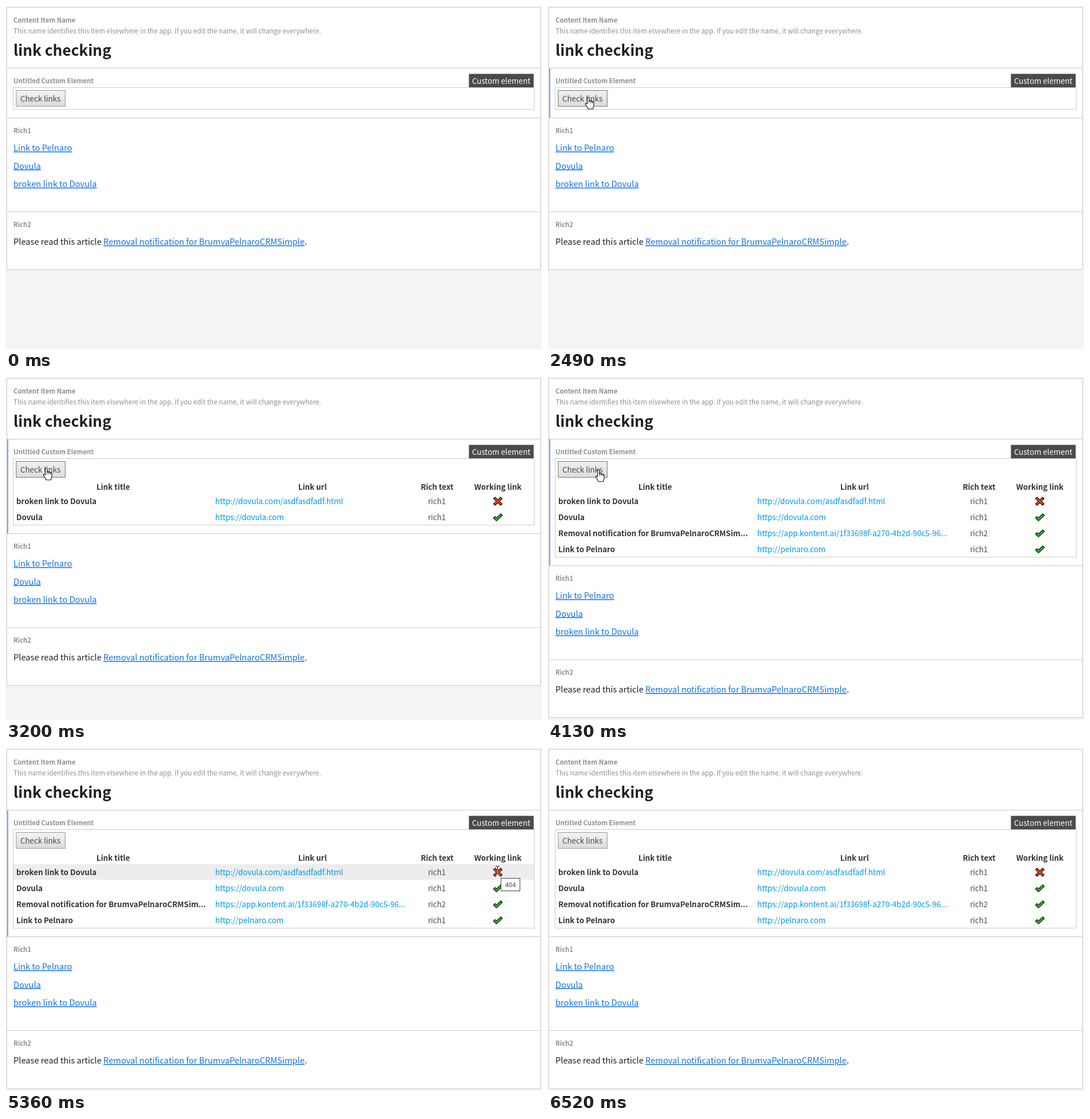
An HTML page for the animation above (7.38 s loop, 935x599 px).

```html
<!DOCTYPE html>
<html lang="en">
<head>
<meta charset="utf-8">
<title>Link checking</title>
<style>
  html, body { margin: 0; width: 100%; height: 100%; overflow: hidden; background: #f4f4f4; }
  svg { display: block; width: 100%; height: 100%; isolation: isolate; }
  text { font: 13.3px "Noto Sans CJK JP", "Noto Sans CJK SC", "Open Sans", sans-serif; fill: #4a4a4a; }
  .label { font-size: 11.3px; font-weight: 700; fill: #8f8f8f; }
  .hint { font-size: 11.7px; fill: #8f8f8f; }
  .title { font-size: 26.2px; font-weight: 700; fill: #1f1f1f; }
  .body { font-size: 14.65px; fill: #1f1f1f; }
  .link { fill: #0f70ee; text-decoration: underline; text-decoration-thickness: 1px; text-underline-offset: 2px; }
  .bold { font-weight: 700; fill: #333; }
  .mid { text-anchor: middle; }
  .url { font-size: 13.4px; fill: #0096e8; }
  .tip { font: 11px "Open Sans", sans-serif; fill: #333; }
  .edge { fill: none; stroke: #ccc; }
  .bar { fill: #6fa8f5; }
  .icon { fill: none; stroke: #111; stroke-width: 5; }
  .icon + .icon { stroke-width: 2.8; }
  .red { stroke: #e8401c; }
  .green { stroke: #22bb22; }
  .pointer { fill: #fff; stroke: #111; stroke-width: 1.1; stroke-linejoin: round; }
  #beam { fill: none; stroke: #fff; mix-blend-mode: difference; }
</style>
</head>
<body>
<svg viewBox="0 0 935 599">
  <defs>
    <linearGradient id="idle" x2="0" y2="1">
      <stop stop-color="#f3f3f3"/><stop offset="1" stop-color="#dcdcdc"/>
    </linearGradient>
    <linearGradient id="active" x2="0" y2="1">
      <stop stop-color="#f0f0f0"/><stop offset="1" stop-color="#dcdcdc"/>
    </linearGradient>
    <g id="cross">
      <path class="icon" d="M-6.6-6.2 6.6 6.2M6.6-6.2-6.6 6.2"/>
      <path class="icon red" d="M-5.7-5.3 5.7 5.3M5.7-5.3-5.7 5.3"/>
    </g>
    <g id="check">
      <path class="icon" d="M-6.8-.4-2.4 3.6 6.9-5.1"/>
      <path class="icon green" d="M-5.9.4-2.4 3.6 6-4.2"/>
    </g>
  </defs>

  <rect width="935" height="599" fill="#f4f4f4"/>
  <rect id="card" class="edge" x="1.5" y="2.5" width="931" height="458" style="fill:#fff"/>
  <path class="edge" d="M2 108.5H932"/>
  <text class="label" x="13" y="29">Content Item Name</text>
  <text class="hint" x="13" y="48">This name identifies this item elsewhere in the app. If you edit the name, it will change everywhere.</text>
  <text class="title" x="13" y="87">link checking</text>

  <text class="label" x="13" y="135">Untitled Custom Element</text>
  <rect id="box" class="edge" x="12.5" y="142.5" width="909" height="38"/>
  <rect x="807.5" y="118.5" width="113" height="23.5" fill="#4a4a4d"/>
  <text x="813" y="136" style="fill:#fff">Custom element</text>
  <rect id="button" x="17.8" y="147.5" width="85.5" height="27.8"/>
  <text x="25" y="167">Check links</text>

  <g id="table">
    <text class="bold mid" x="187" y="197">Link title</text>
    <text class="bold mid" x="534.7" y="197">Link url</text>
    <text class="bold mid" x="752" y="197">Rich text</text>
    <text class="bold mid" x="858" y="197">Working link</text>
    <rect id="hover" x="13" y="203" width="908" height="27" fill="#ededed"/>
    <g id="rows"></g>
  </g>

  <g id="lower">
    <path class="edge" d="M2 195.5H932M2 359.5H932"/>
    <rect id="richBar" class="bar" x="2" y="196" width="2" height="163"/>
    <text class="label" x="13" y="222">Rich1</text>
    <text class="body link" x="13" y="253">Link to Pelnaro</text>
    <text class="body link" x="13" y="284.5">Dovula</text>
    <text class="body link" x="13" y="316">broken link to Dovula</text>
    <text class="label" x="13" y="386">Rich2</text>
    <text class="body" x="13" y="417">Please read this article <tspan class="link">Removal notification for BrumvaPelnaroCRMSimple</tspan>.</text>
  </g>
  <rect id="customBar" class="bar" x="2" y="109" width="2" height="86"/>

  <g id="tooltip">
    <rect x="863.5" y="227.5" width="33" height="22" fill="#fff" stroke="#444"/>
    <text class="tip mid" x="880" y="243">404</text>
  </g>

  <path id="beam" d="M-3-7.5H0M1-7.5H4M-3 7.5H0M1 7.5H4M.5-7V7"/>
  <path id="arrow" class="pointer" d="M.5.5V16.5L4.2 13 6.6 18.5 9.1 17.4 6.7 12H11.5Z"/>
  <path id="hand" class="pointer" d="M-1.5 12V1.8a1.6 1.6 0 0 1 3.2 0V7c.6-1 2.8-.8 3.1.6.8-.9 2.6-.6 2.9.8.9-.7 2.3-.1 2.3 1.5V14c0 2.5-1.4 3.4-1.6 6.7H0c-.2-2.2-2.6-4.2-4.3-7.2-1.4-2.4.8-3.6 2.8-1.5ZM1.7 7v3.5M4.8 7.6v3.2M7.7 8.4v2.6"/>
</svg>
<script>
const LOOP = 7380;
const $ = id => document.getElementById(id);
const show = (id, on) => { $(id).style.display = on ? "" : "none"; };

const links = [
  ["broken link to Dovula", "http://dovula.com/asdfasdfadf.html", "rich1", "cross"],
  ["Dovula", "https://dovula.com", "rich1", "check"],
  ["Removal notification for BrumvaPelnaroCRMSim...", "https://app.kontent.ai/1f33698f-a270-4b2d-90c5-96...", "rich2", "check"],
  ["Link to Pelnaro", "http://pelnaro.com", "rich1", "check"]
];
$("rows").innerHTML = links.map(([title, url, field, icon], i) => {
  const y = 222 + 28 * i;
  return `<g><text class="bold" x="18" y="${y}">${title}</text>
    <text class="url" x="365" y="${y}">${url}</text>
    <text class="mid" x="751.7" y="${y}">${field}</text>
    <use href="#${icon}" x="858" y="${y - 5}"/></g>`;
}).join("");

// Bursts of pointer movement: start, end, number of steps
const bursts = [[1030, 1720, 10], [1800, 2340, 8], [4130, 4830, 10], [4900, 5210, 5], [5360, 5360, 1], [6290, 6520, 4]];

// Pointer path: time, x, y
const path = [
  [1030, 840, 300], [1180, 690, 285], [1330, 520, 265], [1490, 370, 247], [1643, 238, 229], [1720, 201, 214],
  [1800, 170, 193], [1880, 146, 181], [2030, 112, 170], [2340, 70, 159],
  [4129, 70, 159], [4130, 88, 162], [4210, 150, 156], [4290, 270, 150], [4440, 480, 170], [4600, 680, 193],
  [4830, 819, 207], [5210, 856, 217], [5360, 857, 214], [6289, 857, 214],
  [6290, 872, 214], [6370, 892, 216], [6443, 912, 218]
];

function snap(t) {
  let last = 0;
  for (const [from, to, n] of bursts) {
    if (t < from) break;
    const step = (to - from) / (n - 1) || 1;
    last = from + step * Math.min(n - 1, Math.floor((t - from) / step + 0.01));
  }
  return last;
}

function pointerAt(t) {
  let i = path.findIndex(p => p[0] > t);
  if (i < 0) i = path.length;
  const a = path[i - 1], b = path[i] || a;
  const u = b === a ? 0 : (t - a[0]) / (b[0] - a[0]);
  return [1, 2].map(k => Math.round(a[k] + (b[k] - a[k]) * u));
}

function pointerKind(x, y, t) {
  if (t < 1800) return "beam";
  if (x > 17 && x < 104 && y > 147 && y < 176) return "hand";
  return x > 845 && x < 868 ? "beam" : "arrow";
}

function render(t) {
  const count = [3120, 3200, 3270, 3270].filter(at => t >= at).length;
  const open = t >= 3040;
  const grow = open ? 22 + 28 * count : 0;
  $("card").setAttribute("height", 458 + grow);
  $("box").setAttribute("height", 38 + grow);
  $("customBar").setAttribute("height", 86 + grow);
  $("lower").setAttribute("transform", `translate(0 ${grow})`);
  show("table", open);
  [...$("rows").children].forEach((row, i) => { row.style.display = i < count ? "" : "none"; });

  const live = t >= 1030 && t < 6520;
  const [x, y] = live ? pointerAt(snap(t)) : [0, 0];
  const kind = live ? pointerKind(x, y, t) : "";
  for (const id of ["beam", "arrow", "hand"]) show(id, id === kind);
  if (kind) $(kind).setAttribute("transform", `translate(${x} ${y})`);

  const active = kind === "hand" && t >= 2490;
  $("button").setAttribute("fill", active ? "url(#active)" : "url(#idle)");
  $("button").setAttribute("stroke", active ? "#777" : "#999");
  show("richBar", live && t < 1800);
  show("customBar", live && t >= 1800);
  show("hover", live && t > 4130 && y >= 203);
  show("tooltip", t >= 5360 && t < 6290);
}

const start = performance.now();
function frame() {
  render((performance.now() - start) % LOOP);
  requestAnimationFrame(frame);
}
frame();
</script>
</body>
</html>
```
